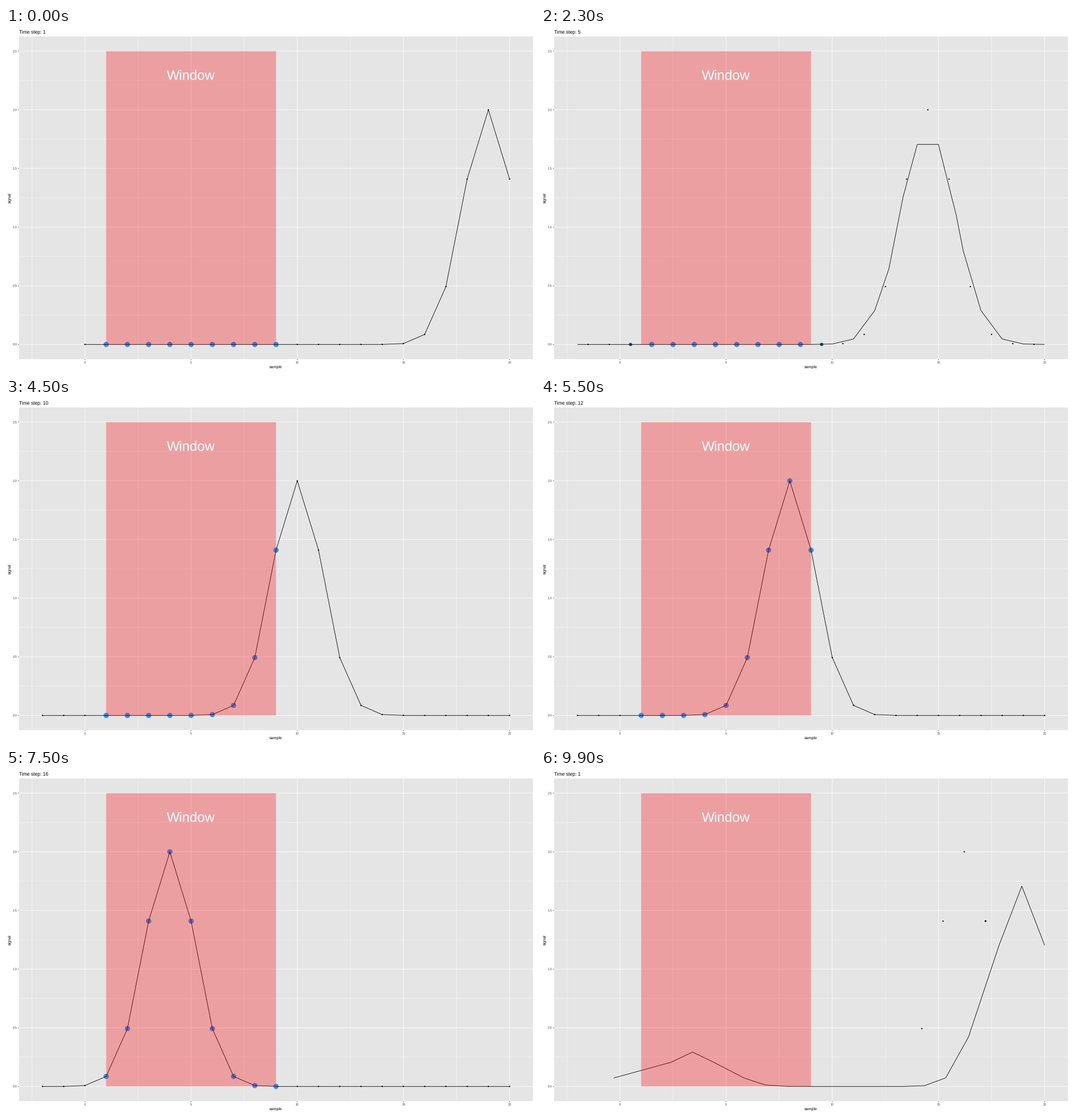
Recreate the animation shown at these times as a matplotlib script. Size 928x603 px, loop 10000 ms.

```python
import numpy as np
import matplotlib.pyplot as plt
from matplotlib.animation import FuncAnimation
from matplotlib.patches import Rectangle

W, H, DPI = 928, 603, 64
PT = 72 / DPI
STATES, PER_STATE = 20, 5
LEFT, RIGHT, TOP, BOTTOM = 23.0, 924.45, 14.9, 582.1
BLUE = np.array([46, 146, 248]) / 255

plt.rcParams.update({
    "font.family": "Liberation Sans",
    "text.hinting": "none",
    "path.snap": False,
})


def px(x):
    return LEFT + (np.asarray(x) + 3.1) * (RIGHT - LEFT) / 24.2


def py(y):
    return BOTTOM - (np.asarray(y) + 0.125) * (BOTTOM - TOP) / 2.75


def pulse(d):
    return 2 * np.exp(-0.35 * np.asarray(d, float) ** 2)


def samples(state):
    """Positions of the samples and their offsets from the peak."""
    x = np.arange(max(-2, 1 - state), 21)
    return x, x - (STATES - state)


def resample(x, y, n=50):
    """Split edges in proportion to length; the longest takes the rest."""
    extra = n - len(x)
    length = np.round(np.hypot(np.diff(x), np.diff(y)), 9)
    cuts = np.round(length / length.sum() * extra).astype(int)
    cuts[np.argmax(length)] += extra - cuts.sum()
    at = np.concatenate([i + np.arange(c + 1) / (c + 1)
                         for i, c in enumerate(cuts)] + [[len(cuts)]])
    i = np.arange(len(x))
    return np.array([np.interp(at, i, x), np.interp(at, i, y)])


def path(state):
    x, d = samples(state)
    return resample(x, pulse(d))


def picked(x):
    return ((x >= 1) & (x <= 9)).astype(float)


def dots(a, b, p):
    """Dots present in both states, moved from a to b."""
    xa, da = samples(a)
    if p == 0:
        return xa, pulse(da), picked(xa)
    xb, db = samples(b)
    d, ia, ib = np.intersect1d(da, db, return_indices=True)
    x = xa[ia] * (1 - p) + xb[ib] * p
    on = picked(xa[ia]) * (1 - p) + picked(xb[ib]) * p
    return x, pulse(d), on


fig = plt.figure(figsize=(W / DPI, H / DPI), dpi=DPI, facecolor="white")
ax = fig.add_axes([0, 0, 1, 1])
ax.set_xlim(0, W)
ax.set_ylim(H, 0)
ax.axis("off")


def text(x, y, s, size, color="black", ha="center", **kw):
    return ax.text(x, y, s, fontsize=size * PT, color=color, ha=ha,
                   va="baseline", zorder=6, **kw)


def rule(x, y, width, color="white"):
    ax.plot(x, y, color=color, lw=width * PT, solid_capstyle="butt", zorder=1)


ax.add_patch(Rectangle((LEFT, TOP), RIGHT - LEFT, BOTTOM - TOP,
                       fc="#e5e5e5", lw=0, zorder=0))

for v in np.arange(-2.5, 20, 5):
    rule([px(v)] * 2, [TOP, BOTTOM], 0.4)
for v in np.arange(0.25, 2.5, 0.5):
    rule([LEFT, RIGHT], [py(v)] * 2, 0.4)
for v in range(0, 21, 5):
    rule([px(v)] * 2, [TOP, BOTTOM], 0.8)
    rule([px(v)] * 2, [BOTTOM, BOTTOM + 1.8], 0.7, "#333333")
    text(px(v), 589.5, str(v), 5.68, "#4d4d4d")
for v in np.arange(0, 2.6, 0.5):
    rule([LEFT, RIGHT], [py(v)] * 2, 0.8)
    rule([LEFT - 1.8, LEFT], [py(v)] * 2, 0.7, "#333333")
    text(19.8, py(v) + 2.05, f"{v:.1f}", 5.68, "#4d4d4d", ha="right")

text((LEFT + RIGHT) / 2, 597.9, "sample", 7.1)
text(8.6, (TOP + BOTTOM) / 2, "signal", 7.1, rotation=90,
     rotation_mode="anchor")
title = text(LEFT, 9.7, "", 8.52, ha="left")

points = ax.scatter([], [], linewidths=0, zorder=2)
line, = ax.plot([], [], color="black", lw=0.85 * PT, zorder=3,
                solid_joinstyle="round", solid_capstyle="butt")
ax.add_patch(Rectangle((px(1), py(2.5)), px(9) - px(1), py(0) - py(2.5),
                       fc=(1, 0, 0.02, 0.3), lw=0, zorder=4))
text(px(5), 90.6, "Window", 23.9, "white")


def progress(step, k):
    if step == 0:
        return k / PER_STATE
    return max(0, k - 1) / (PER_STATE - 1)


def update(frame):
    step, k = divmod(frame, PER_STATE)
    t = progress(step, k)
    p = (1 - np.cos(np.pi * t)) / 2
    a, b = step + 1, (step + 1) % STATES + 1

    x, y = path(a) * (1 - p) + path(b) * p
    line.set_data(px(x), py(y))

    x, y, on = dots(a, b, p)
    diameter = 2.3 + 6.9 * on
    points.set_offsets(np.column_stack([px(x), py(y)]))
    points.set_sizes((diameter * PT) ** 2, DPI)
    points.set_facecolors(on[:, None] * BLUE)

    title.set_text(f"Time step: {b if t > 0.5 else a}")
    return points, line, title


anim = FuncAnimation(fig, update, frames=STATES * PER_STATE, interval=100,
                     repeat=True, repeat_delay=0)
plt.show()
```
